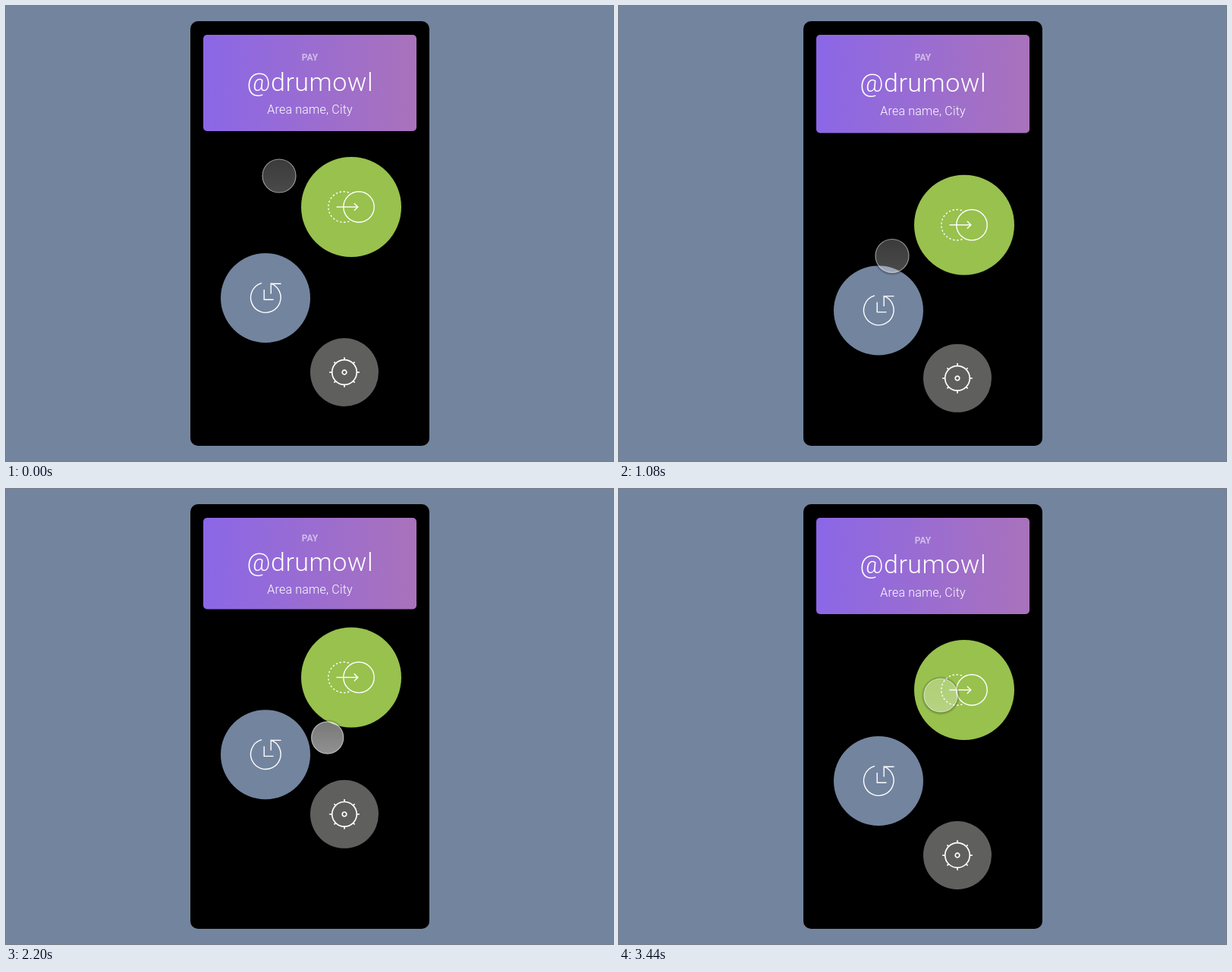
An HTML page with a canvas that plays this animation: 800 by 600 pixels, repeating every 3.46 s.

```html
<!DOCTYPE html>
<html lang="en">
<head>
<meta charset="utf-8">
<title>Pull and release</title>
<style>
html, body { margin: 0; width: 100%; height: 100%; overflow: hidden; background: #73849e; }
canvas { display: block; }
</style>
</head>
<body>
<canvas id="stage" width="800" height="600"></canvas>
<script>
const ctx = document.getElementById('stage').getContext('2d');
const LOOP = 3460;
const TAU = Math.PI * 2;
const FONT = 'Roboto, "Open Sans", sans-serif';

// Each drag: press, start and end of the move, release (ms), and the path in y.
const PULL = { press: 215, start: 220, end: 800, release: 955, from: 224, to: 329.5 };
const PUSH = { press: 1770, start: 1800, end: 2435, release: 2440, from: 454, to: 272 };

// Farthest shift of every part: [pulled down, pushed up].
const SHIFT = {
  send: [44.4, -23],
  history: [30.9, -48.3],
  settings: [14.7, -75.2],
  card: [4.8, -9],
  label: [0.8, -4.4],
  name: [2.5, -5],
  area: [3.6, -5.8]
};

const clamp = v => Math.max(0, Math.min(1, v));
const mix = (a, b, p) => a + (b - a) * p;
const smooth = p => p * p * (3 - 2 * p);
const progress = (t, a, b) => smooth(clamp((t - a) / (b - a)));

// Rubber-band stretch while held, critically damped spring after release.
function stretch(drag, t) {
  if (t < drag.start) return 0;
  const p = progress(t, drag.start, drag.end);
  const held = p * 1.144 / (1 + 0.144 * p);
  const u = Math.max(0, t - drag.release) * 0.0125;
  return held * (1 + u) * Math.exp(-u);
}

function pressure(drag, t) {
  const ease = p => 1 - (1 - p) ** 2;
  return ease(clamp((t - drag.press) / 50)) - ease(clamp((t - drag.release) / 50));
}

function touchAt(t) {
  const press = pressure(PULL, t) + pressure(PUSH, t);
  if (t < 1080) {
    return { x: 360, y: mix(PULL.from, PULL.to, progress(t, PULL.start, PULL.end)), press };
  }
  if (t < PUSH.start) {
    const p = progress(t, 1080, 1720);
    return {
      x: mix(360, 423, p) - 18.5 * Math.sin(Math.PI * p),
      y: mix(PULL.to, PUSH.from, p),
      press
    };
  }
  const p = progress(t, PUSH.start, PUSH.end);
  return { x: mix(423, 424, p), y: mix(PUSH.from, PUSH.to, p), press };
}

function box(x, y, w, h, r, fill) {
  ctx.fillStyle = fill;
  ctx.beginPath();
  ctx.roundRect(x, y, w, h, r);
  ctx.fill();
}

function disc(x, y, r, fill) {
  ctx.fillStyle = fill;
  ctx.beginPath();
  ctx.arc(x, y, r, 0, TAU);
  ctx.fill();
}

function arc(x, y, r, from = 0, to = TAU) {
  ctx.beginPath();
  ctx.arc(x, y, r, from, to);
  ctx.stroke();
}

function line(...pts) {
  ctx.beginPath();
  for (let i = 0; i < pts.length; i += 2) ctx.lineTo(pts[i], pts[i + 1]);
  ctx.stroke();
}

function text(str, y, font, color, spacing = 0) {
  ctx.font = font + ' ' + FONT;
  ctx.letterSpacing = spacing + 'px';
  ctx.fillStyle = color;
  ctx.fillText(str, 400.5 + spacing / 2, y);
}

function sendIcon() {
  ctx.lineWidth = 1.4;
  arc(10, 0, 20.2);
  line(-19.5, 0, 8.5, 0);
  line(3.8, -4.8, 8.8, 0, 3.8, 4.8);
  ctx.setLineDash([2.4, 2.6]);
  arc(-10, 0, 20.2, 1.2, TAU - 1.2);
  ctx.setLineDash([]);
}

function historyIcon() {
  ctx.lineWidth = 1.4;
  arc(0.3, -0.5, 19.8, -1.22, -1.84 + TAU);
  line(7.2, -5.5, 7.2, -18.8, 20.5, -18.8);
  line(-1.8, -11, -1.8, 2.2, 10.5, 2.2);
}

function settingsIcon() {
  ctx.lineWidth = 1.7;
  arc(0, 0, 16.3);
  arc(0, 0, 2.8);
  for (let i = 0; i < 8; i++) {
    const a = i * TAU / 8, end = i % 2 ? 19.2 : 19.8;
    const c = Math.cos(a), s = Math.sin(a);
    line(c * 16.5, s * 16.5, c * end, s * end);
  }
}

function button(x, y, r, color, icon) {
  ctx.save();
  ctx.translate(x, y);
  disc(0, 0, r, color);
  ctx.strokeStyle = '#fff';
  icon();
  ctx.restore();
}

function drawCard(shift) {
  const fill = ctx.createLinearGradient(260, 0, 541, 0);
  fill.addColorStop(0, '#8b67e7');
  fill.addColorStop(1, '#a972bb');
  box(260, 38, 281, 127 + shift('card'), 5, fill);
  text('PAY', 72 + shift('label'), 'bold 12px', 'rgba(255,255,255,0.55)');
  text('@drumowl', 111.5 + shift('name'), '300 34px', '#fff', 0.5);
  text('Area name, City', 142 + shift('area'), '300 16px', '#fff', 0.2);
}

function drawTouch({ x, y, press }) {
  const r = mix(22.3, 21.4, press);
  const white = a => `rgba(255,255,255,${a})`;

  const shade = ctx.createRadialGradient(x, y + 0.5, r, x, y + 0.5, r + 3.5);
  shade.addColorStop(0, 'rgba(0,0,0,0.28)');
  shade.addColorStop(1, 'rgba(0,0,0,0)');
  ctx.fillStyle = shade;
  ctx.beginPath();
  ctx.arc(x, y + 0.5, r + 3.5, 0, TAU);
  ctx.arc(x, y, r, 0, TAU, true);
  ctx.fill();

  const fill = ctx.createLinearGradient(0, y - r, 0, y + r);
  fill.addColorStop(0, white(mix(0.23, 0.47, press)));
  fill.addColorStop(1, white(mix(0.29, 0.57, press)));
  disc(x, y, r, fill);
  ctx.strokeStyle = white(0.48);
  ctx.lineWidth = 1.2;
  arc(x, y, r - 0.3);
}

function draw(t) {
  const down = stretch(PULL, t), up = stretch(PUSH, t);
  const shift = part => SHIFT[part][0] * down + SHIFT[part][1] * up;

  ctx.fillStyle = '#73849e';
  ctx.fillRect(0, 0, 800, 600);
  box(243, 20, 315, 560, 10, '#000');
  drawCard(shift);
  button(455, 265 + shift('send'), 66, '#98c14e', sendIcon);
  button(342, 385 + shift('history'), 59, '#73849e', historyIcon);
  button(446, 483 + shift('settings'), 45, '#5f5f5e', settingsIcon);
  drawTouch(touchAt(t));
}

ctx.textAlign = 'center';
const begin = performance.now();
function tick() {
  draw((performance.now() - begin) % LOOP);
  requestAnimationFrame(tick);
}
tick();
</script>
</body>
</html>
```
